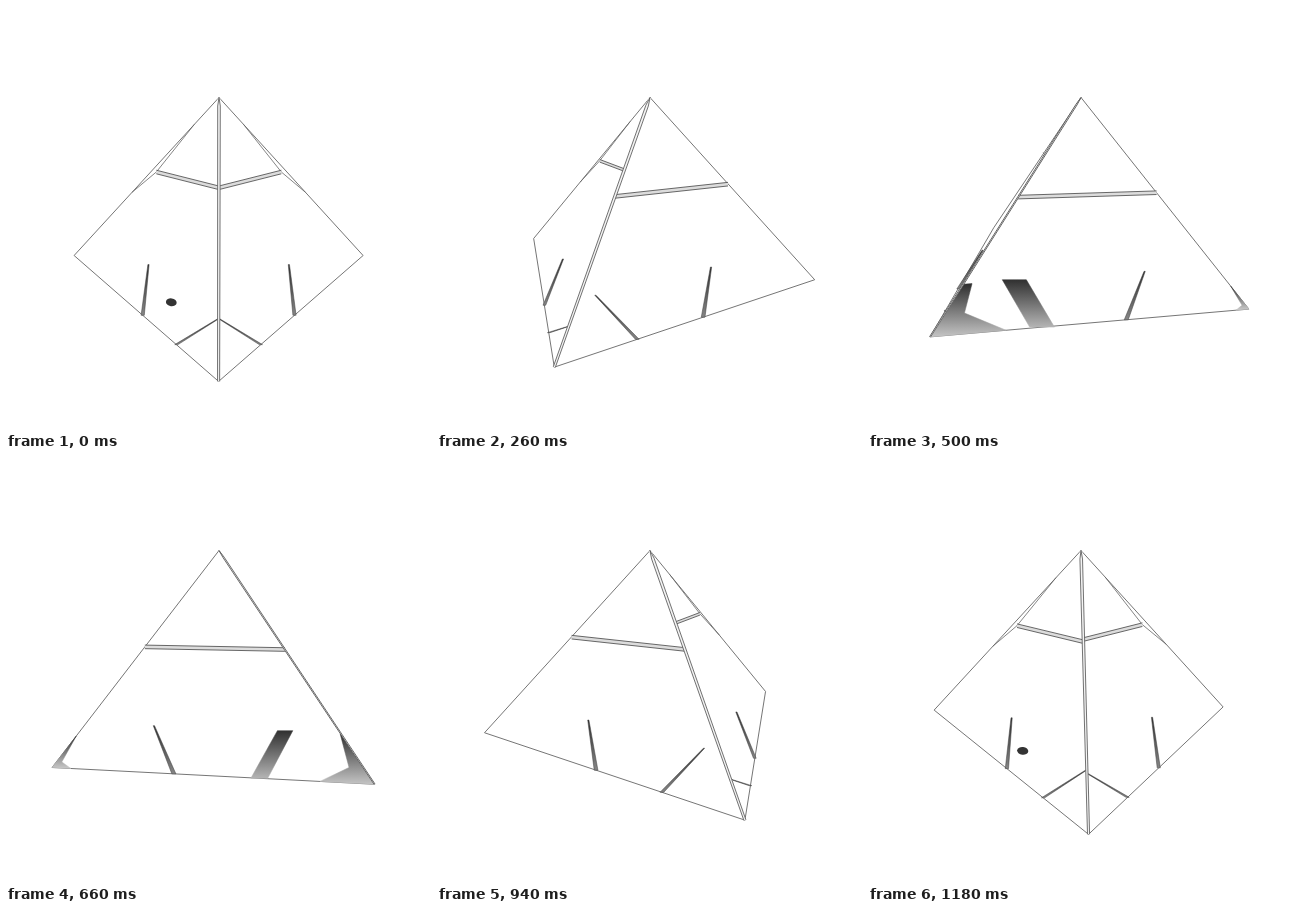
Animation, 425 px wide and 425 px high, one loop 1200 ms. Source, as an HTML page with a canvas:

```html
<!DOCTYPE html>
<html>
<head>
<meta charset="utf-8">
<style>
html, body { margin: 0; height: 100%; overflow: hidden; background: #fff; }
canvas { display: block; width: 425px; height: 425px; }
</style>
</head>
<body>
<canvas id="c" width="425" height="425"></canvas>
<script>
const g = document.getElementById('c').getContext('2d');
const LOOP = 1200, STEP = 20, K = 0.524;
const APEX = [213, 91.5];
const rad = d => d * Math.PI / 180;
const clamp = (v, a, b) => Math.min(b, Math.max(a, v));
const mix = (p, q, t) => p.map((v, i) => v + (q[i] - v) * t);
const depth = deg => 1 - K * Math.cos(rad(deg));

// Base corner in perspective, 0 degrees facing the viewer
function corner(deg) {
  const w = depth(deg);
  return [212.6 + 144.5 * Math.sin(rad(deg)) / w, (249.5 - 70.8 * Math.cos(rad(deg))) / w];
}

function path(pts, close) {
  g.beginPath();
  pts.forEach(p => g.lineTo(p[0], p[1]));
  if (close) g.closePath();
}

function line(pts, color = '#666', width = 0.9) {
  path(pts);
  g.strokeStyle = color;
  g.lineWidth = width;
  g.stroke();
}

function shade(pts, y0, y1, light, edge) {
  const f = g.createLinearGradient(0, y0, 0, y1);
  f.addColorStop(0, '#303030');
  f.addColorStop(1, light);
  path(pts, true);
  g.fillStyle = f;
  g.fill();
  g.strokeStyle = edge || f;
  g.lineWidth = 0.5;
  g.stroke();
}

// Where the band meets an edge, as a share of the edge on screen
function cut(deg) {
  if (deg > 70.5) return Math.max(0.432, 0.4735 - 0.0021 * (deg - 70.5));
  const r = rad(2 * deg);
  const q = 0.945 + 0.275 * Math.sin(r) + 0.035 * Math.cos(r) + Math.min(0, deg) * 0.0037;
  const o = q * depth(deg);
  return o / (1 + o);
}

function bandEnd(c, deg) {
  const p = mix(APEX, c, cut(deg));
  const dip = 7 * Math.exp(-(((deg - 95) / 14) ** 2));
  p[1] += dip;
  if (dip > 1) line([mix(APEX, c, 0.17), p, mix(APEX, c, 0.6)], '#666', 0.8);
  return p;
}

function band(a, b, psi) {
  const p = bandEnd(a, 45 - psi), q = bandEnd(b, 45 + psi);
  const h = Math.abs(psi) > 55 ? 1.3 : 1.8;
  const at = s => [[p[0], p[1] + s], [q[0], q[1] + s]];
  path([...at(-h), ...at(h).reverse()], true);
  g.fillStyle = '#dcdcdc';
  g.fill();
  line(at(-h), '#444', 0.8);
  line(at(h), '#444', 0.8);
}

// The foot slides along the base as the face turns; the tip leans towards u = 0
function slot(at, psi) {
  const u = 0.115 + 0.65 / (1 + Math.exp((psi + 10) / 22));
  const lean = 0.125 * Math.exp(psi / 90);
  const part = Math.min(1, u / lean);
  const [x, y] = at(u, 0), [tx, ty] = at(u - lean * part, 0.17 * part);
  const open = 21 * Math.exp(-(((psi - 8) / 5) ** 2));
  const w = (3.2 + 0.8 * Math.cos(rad(2 * psi)) + open) / 2, n = (1.2 + open * 1.1) / 2;
  shade([[tx - n, ty], [tx + n, ty], [x + w, y], [x - w, y]],
    ty, y, open > 5 ? '#b4b4b4' : '#858585', open > 5 ? null : '#3c3c3c');
}

function wedge(at, psi) {
  if (psi < -20 || psi > 14) return;
  const f = 0.1 * Math.exp(psi / 10) * clamp((14 - psi) / 5, 0, 1);
  const top = Math.min(0.165, f * 1.75);
  const pts = [at(0, 0), at(0, top), at(Math.max(0, (f - 0.15) / 2), top),
    at(0.29 * f, 0.283 * f), at(f, 0)];
  shade(pts, pts[1][1], pts[0][1], '#c4c4c4');
}

// psi is the angle between the face and the viewer
function face(psi) {
  const a = corner(psi - 45), b = corner(psi + 45);
  const wa = depth(psi - 45), wb = depth(psi + 45);
  if ((a[0] - APEX[0]) * (b[1] - APEX[1]) > (a[1] - APEX[1]) * (b[0] - APEX[0])) return;
  // u runs along the base, v up to the apex
  const at = (u, v) => {
    const l = (1 - u) * wa, r = u * wb;
    return APEX.map((p, i) => (a[i] * l + b[i] * r + p * v) / (l + r + v));
  };
  line([a, APEX, b, a]);
  band(a, b, psi);
  for (const [place, turn] of [[at, psi], [(u, v) => at(1 - u, v), -psi]]) {
    wedge(place, turn);
    slot(place, turn);
  }
}

function ridge(deg) {
  const b = corner(deg), dx = b[0] - APEX[0], dy = b[1] - APEX[1], n = Math.hypot(dx, dy);
  const wide = Math.abs(deg) < 33 ? 1.3 : 0.6;
  line([APEX, b], '#f4f4f4', wide * 2);
  for (const s of [-wide, wide]) {
    const x = s * dy / n, y = -s * dx / n;
    line([APEX, [APEX[0] + x + dx * 0.03, APEX[1] + y + dy * 0.03],
      [b[0] + x * 0.8, b[1] + y * 0.8]], '#505050', 0.8);
  }
}

function dot(t) {
  const s = t > LOOP / 2 ? t - LOOP : t;
  if (s < -185 || s > 90) return;
  g.beginPath();
  g.ellipse(165.3 + 0.52 * s - 0.00042 * s * s, 296.3 + 0.222 * s,
    5.4 - Math.min(0, s) * 0.009, 3.9, 0.12, 0, 7);
  g.fillStyle = '#333';
  g.fill();
}

function draw(t) {
  g.fillStyle = '#fff';
  g.fillRect(0, 0, 425, 425);
  const turn = 90 * t / LOOP;
  for (const psi of [135, -45, 45]) face(psi - turn);
  ridge(turn <= 45 ? -turn : 90 - turn);
  dot(t);
}

const start = performance.now();
function tick() {
  const t = (performance.now() - start) % LOOP;
  draw(Math.floor(t / STEP) * STEP);
  requestAnimationFrame(tick);
}
tick();
</script>
</body>
</html>
```
